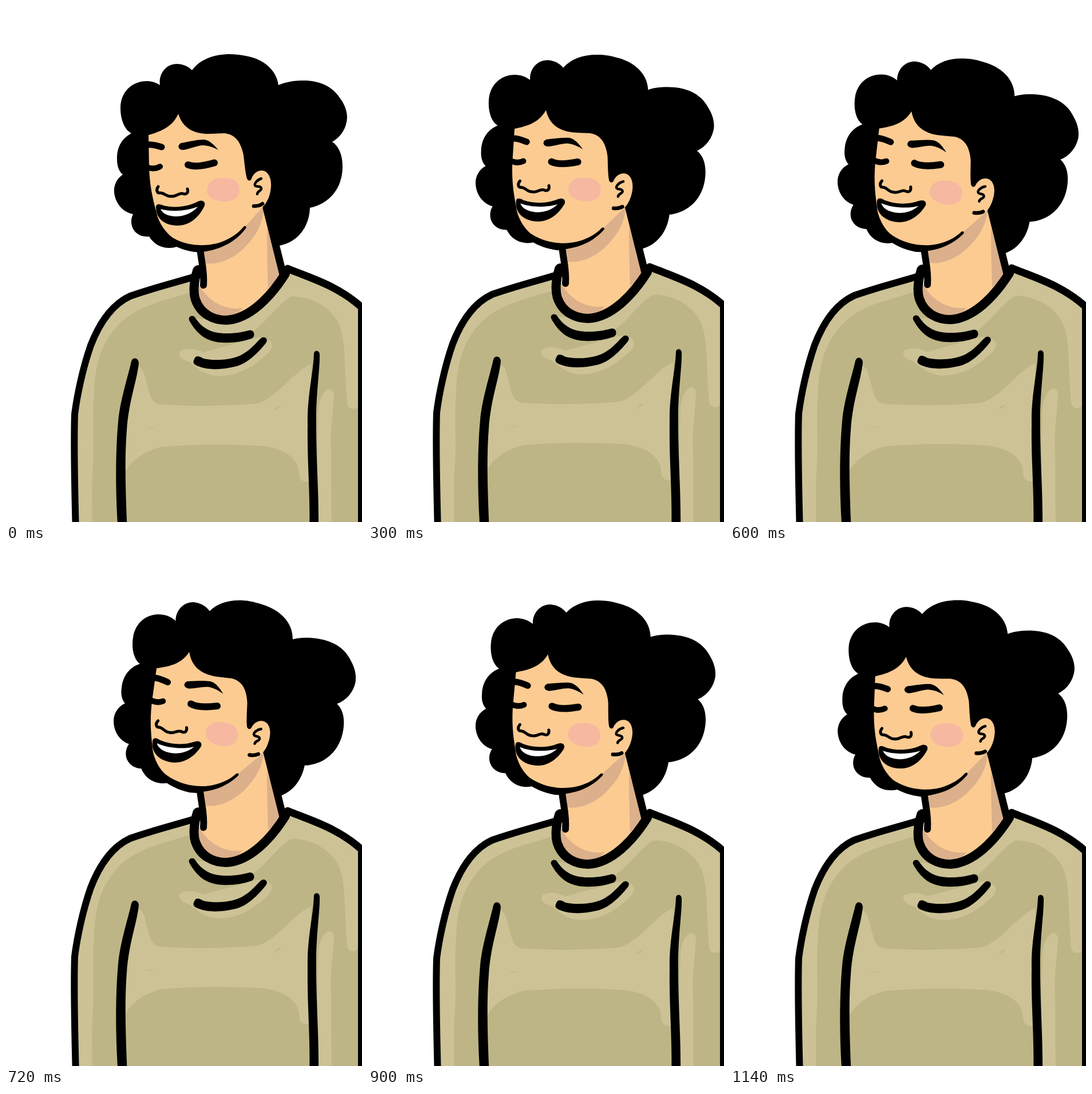
These frames come from a looping animation (622 px wide and 900 px high, 1.17 s). An HTML page:

```html
<!DOCTYPE html>
<html lang="en">
<head>
<meta charset="utf-8">
<title>Laughing woman</title>
<style>
  html, body { margin: 0; width: 100%; height: 100%; overflow: hidden; background: #fff; }
  svg { display: block; width: 100%; height: 100%; }
  .skin { fill: #fccb92; }
  .tan { fill: #dbb08b; }
  .dark { fill: #bdb585; }
  .light { fill: #ccc296; }
  .line { fill: none; stroke: #000; stroke-linecap: round; stroke-linejoin: round; }
</style>
</head>
<body>
<svg viewBox="0 0 622 900" preserveAspectRatio="none">
  <g class="head">
    <path d="M219 222C206 215 200 196 200 178C200 150 220 131 246 131C255 131 263 134 269 138C266 118 280 101 298 101C309 101 318 105 325 112C338 94 362 84 392 84C400 84 407 85 413 86C445 90 472 108 476 138C490 132 505 130 520 130C548 130 570 140 583 160C593 173 596 185 596 195C595 212 586 228 570 237C583 246 588 262 588 280C588 318 565 345 531 352C530 385 510 412 478 418L340 430C324 429 311 424 300 419C296 421 291 422 285 422C270 422 258 415 250 402C240 403 231 400 225 393C218 385 217 373 222 363C205 360 191 345 189 325C188 315 192 302 204 294C198 289 194 280 194 268C193 250 200 232 219 222Z"/>
  </g>

  <g id="body">
    <!-- neck -->
    <path class="skin" d="M339 405L346 440L340 490C340 520 365 545 385 547C425 545 462 508 482 470L452 345L400 370Z"/>
    <path class="tan" d="M342 412L349 449C372 452 400 440 420 418C435 402 444 388 449 365L452 345L395 370Z"/>
    <path class="tan" d="M456 388C456 430 457 460 458 492L482 470Z"/>
    <path class="tan" d="M337 485C350 512 380 532 413 527C400 550 345 550 335 510Z"/>
    <!-- sweater -->
    <path class="dark" d="M330 472C290 484 250 494 217 506C184 521 162 556 148 592C134 632 124 680 120 712C118 770 120 840 122 920H625V530C583 488 530 474 492 458C462 508 425 546 385 548C363 548 340 538 331 512Z"/>
    <path class="light" d="M330 472C290 484 250 494 217 506C184 521 162 556 148 592C134 632 124 680 120 712C118 770 120 840 122 920H151C150 880 149 840 152 800C155 760 150 720 154 680C155 620 168 585 200 552C235 520 280 514 326 498Z"/>
    <path class="light" d="M492 458C530 474 583 488 616 524V697C611 706 598 704 596 694C591 640 594 585 583 558C570 525 530 505 498 507C475 520 455 552 428 570C400 585 350 585 325 545L385 548C425 546 462 508 492 458Z"/>
    <path class="light" d="M546 700C552 664 573 660 573 680C571 715 566 740 568 780L569 920H544V760Z"/>
    <path class="light" d="M226 632C238 622 243 645 245 655C252 680 253 694 272 695C330 699 400 697 440 693C475 682 500 640 533 624V828C520 834 511 826 512 812C508 780 470 768 440 767C390 764 330 764 270 769C240 778 222 790 208 812H200Z"/>
    <path class="light" d="M303 608C300 598 325 594 345 604L440 578C475 580 468 600 450 612C425 635 395 648 365 645C345 642 335 632 322 622C312 618 304 615 303 608Z"/>
    <path class="dark" d="M469 705C472 700 477 697 482 696C478 700 474 703 469 705Z"/>
    <path d="M247 735Q253 737 260 736" fill="none" stroke="#bdb585"/>
    <!-- outlines -->
    <g class="line">
      <path stroke-width="12" d="M330 472C290 484 250 494 217 506C184 521 162 556 148 592C134 632 124 680 120 712C118 770 120 840 122 920"/>
      <path stroke-width="13" d="M492 458C530 474 583 488 626 530"/>
      <path stroke-width="10" d="M620 530V920"/>
      <path stroke-width="16" d="M334 462C328 480 327 500 331 512C340 538 363 548 385 548C425 546 462 508 488 467"/>
      <path stroke-width="13" d="M455 352L484 468"/>
      <path stroke-width="12" d="M339 422C341 445 347 462 345 487"/>
    </g>
    <circle cx="336" cy="462" r="10"/>
    <path d="M320 548C318 541 326 538 330 543C342 561 357 571 385 571C400 571 412 569 424 566C434 563 437 577 429 580C412 586 395 588 378 587C350 586 333 572 320 548Z"/>
    <path d="M329 616C331 608 339 611 345 615C370 620 400 617 417 605C430 597 437 587 446 579C453 575 459 582 454 588C440 605 422 624 400 629C378 634 355 636 335 628C327 625 326 621 329 616Z"/>
    <path d="M219 620C221 612 231 613 232 622C230 650 214 690 211 740C207 790 209 850 212 920H196C191 850 191 780 196 725C199 690 212 650 219 620Z"/>
    <path d="M538 606C539 600 547 600 548 607C549 630 541 680 542 730C542 800 547 850 546 920H530C532 850 526 800 527 730C526 680 537 640 538 606Z"/>
  </g>

  <g class="head">
    <path class="skin" d="M249 225C270 219 291 211 301 188C309 213 327 222 351 223C363 223 375 222 382 222C400 224 410 236 415 260C417 277 418 290 421 301C423 306 428 305 429 301C432 292 440 286 448 287C458 288 464 300 463 315C462 330 457 342 448 351L418 385C395 407 365 420 335 420C300 418 275 396 265 368C259 345 251 320 250 280Z"/>
    <path d="M272 390C305 421 348 421 375 412C395 405 408 394 415 385C418 382 421 385 419 388C408 402 395 413 375 421C350 430 330 434 298 420Z"/>
    <path fill="#f6b8a0" d="M379 300C400 299 408 309 408 320C408 333 399 341 380 341C361 340 351 332 351 320C352 308 362 300 379 300Z"/>
    <g class="line">
      <path stroke-width="11" d="M248 242C257 241 265 244 272 246"/>
      <path stroke-width="10" d="M249 282C256 284 264 283 269 280"/>
      <path stroke-width="12" d="M318 277C328 281 345 279 364 273.500"/>
      <path stroke-width="5" d="M266 315C262 320 263 327 270 326C277 326 280 333 289 332C298 333 301 326 308 327C316 330 319 325 317 319"/>
      <path stroke-width="4.500" d="M446 301C439 303 432 311 436 314C439 316 446 313 446 319C445 323 439 323 439 328"/>
      <path stroke-width="6.500" d="M433 349C439 349 444 348 448 345"/>
    </g>
    <path d="M306 239C322 236 335 233 346 233C356 234 364 243 371 251C363 247 354 243 343 243C332 244 322 249 311 251C301 252 298 243 306 239Z"/>
    <path d="M262 351C262 344 269 345 275 348C295 353 318 350 335 341C343 337 349 341 347 348C338 368 321 383 300 383C275 383 262 369 262 351Z"/>
    <path fill="#fff" d="M270 354C290 360 318 357 335 350C326 361 311 367 297 367C284 367 273 362 270 354Z"/>
  </g>
</svg>
<script>
const LOOP = 1170;
// [step, value]; 31 steps per loop
const tilt = [[0, 0], [5, 1.3], [12, 9], [16, 7.6], [19, 9], [24, 6.3], [30, 3.2]];
const bob = [[0, 0], [5, -1], [12, 0], [16, 4.4], [19, 0], [24, 1.5], [27, -1.5], [30, 2.3]];
const lift = [[0, 0], [5, -5], [12, 0], [16, -1], [19, -3], [24, 0], [27, -2], [30, 0]];

const heads = document.querySelectorAll('.head');
const body = document.getElementById('body');

// four steps per 150 ms, the first held twice as long
function stepAt(ms) {
  const rest = ms % 150;
  return 4 * Math.floor(ms / 150) + (rest < 60 ? 0 : Math.floor((rest - 30) / 30));
}

// eased between keys, flat at turning points
function valueAt(keys, n) {
  let i = 0;
  while (i < keys.length - 2 && n >= keys[i + 1][0]) i++;
  const rate = k => (keys[k + 1][1] - keys[k][1]) / (keys[k + 1][0] - keys[k][0]);
  const slope = k => {
    if (k === 0 || k === keys.length - 1) return 0;
    const a = rate(k - 1), b = rate(k);
    return a * b > 0 ? 2 * a * b / (a + b) : 0;
  };
  const [x0, y0] = keys[i], [x1, y1] = keys[i + 1];
  const w = x1 - x0, u = (n - x0) / w, v = 1 - u;
  return y0 * v * v * (1 + 2 * u) + y1 * u * u * (1 + 2 * v)
    + w * u * v * (slope(i) * v - slope(i + 1) * u);
}

function draw() {
  const n = stepAt(performance.now() % LOOP);
  const pose = `translate(0 ${valueAt(bob, n)}) rotate(${valueAt(tilt, n)} 375 305)`;
  heads.forEach(h => h.setAttribute('transform', pose));
  body.setAttribute('transform', `translate(0 ${valueAt(lift, n)})`);
  requestAnimationFrame(draw);
}
draw();
</script>
</body>
</html>
```
